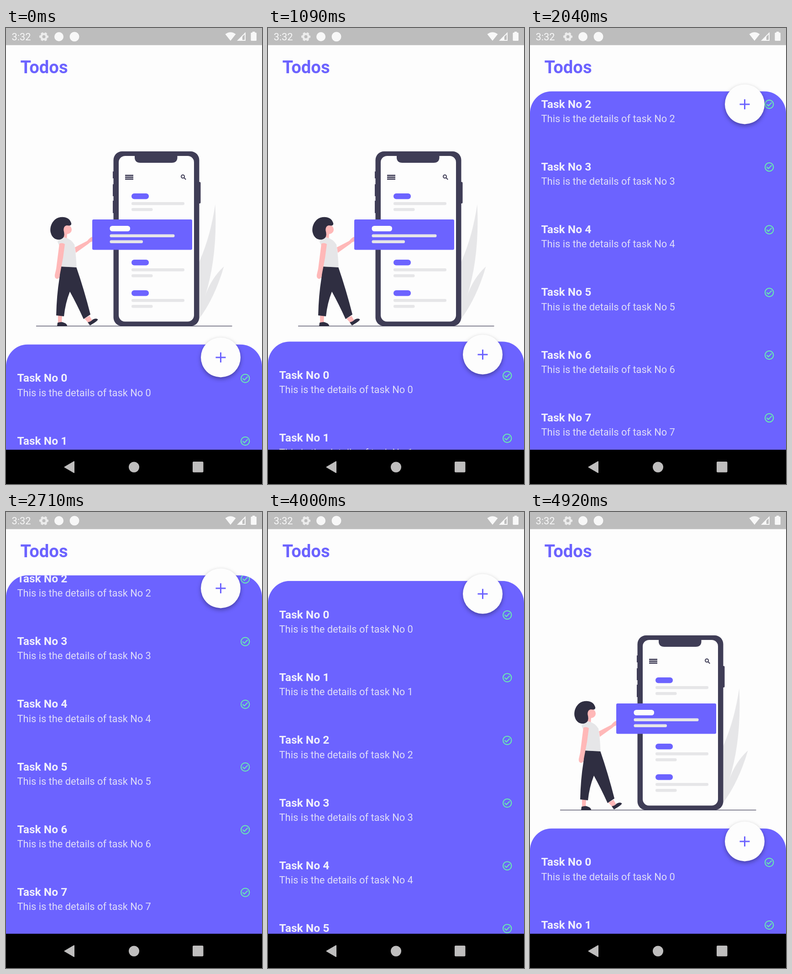
Animation, 561 px wide and 998 px high, one loop 4960 ms. Source, as an HTML page:

```html
<!DOCTYPE html>
<html>
<head>
<meta charset="utf-8">
<style>
  html, body { margin: 0; width: 100%; height: 100%; overflow: hidden; background: #fdfdfd; }
  svg { display: block; font-family: Roboto, sans-serif; }
  .dark { fill: #2f2e41; }
  .phone { fill: #3f3d56; }
  .purple { fill: #6c63ff; }
  .pale { fill: #e6e6e8; }
  .skin { fill: #ffb8b8; }
  .paper { fill: #fdfdfd; }
  .line { fill: none; stroke-width: 2; }
  #fab circle { filter: drop-shadow(0 4px 5px #0005); }
</style>
</head>
<body>
<svg width="561" height="998" viewBox="0 0 561 998">
  <defs>
    <clipPath id="sheetShape"><rect width="561" height="1000" rx="48"/></clipPath>
    <g id="entry">
      <rect class="purple" x="275" y="362" width="38" height="12.5" rx="6"/>
      <rect class="pale" x="275" y="381" width="116" height="6.5" rx="3"/>
      <rect class="pale" x="275" y="394" width="46.500" height="6.500" rx="3"/>
    </g>
    <g id="check" class="line" stroke="#69f0ae">
      <circle r="9.2"/>
      <path d="M-5.700-.3L-2 3.500 5.300-3.900"/>
    </g>
  </defs>

  <text class="purple" x="31.500" y="98.500" font-size="38.200" font-weight="700">Todos</text>

  <g id="plant" class="pale">
    <path d="M422 515Q448 458 458.500 386Q464 500 436 588Q428 615 422 640Z"/>
    <path d="M422 638Q457 592 477.500 522Q449 548 435 590L422 612Z"/>
  </g>

  <g id="device" class="phone">
    <path d="M234 314h4v15h-4zM234 342h4v26h-4zM234 378h4v27h-4z"/>
    <rect x="418" y="337" width="8.500" height="47" rx="2"/>
    <rect x="235.500" y="270" width="188" height="382.500" rx="19"/>
    <rect class="paper" x="247" y="280" width="165" height="362.500" rx="14"/>
    <path d="M282 279H375.500V283Q375.500 295 363 295H294.500Q282 295 282 283Z"/>
    <path d="M261 321.300h18v2.700h-18zM261 325.300h18v2.700h-18zM261 329.300h18v2.700h-18z"/>
    <g class="line" stroke="#3f3d56" stroke-width="1.500"><circle cx="387.500" cy="325" r="3.500"/><path d="M390 327.500l4.200 4.200"/></g>
    <use href="#entry"/><use href="#entry" y="145"/><use href="#entry" y="212"/>
  </g>
  <path d="M66 652.300H495.500" stroke="#3f3d56" stroke-width="1.300"/>

  <g id="woman">
    <path class="skin" d="M114 628h9l-1 18h-8zM172 636l11-6 6 10-9 5z"/>
    <path class="dark" d="M113 645Q123 642 127 645Q134 647 134 652.500H112ZM179 644Q186 643 190 638Q198 634 201.500 638Q200 642 184 651Z"/>
    <path class="skin" d="M151 480L178 466Q185 457 190 457V467Q184 468 181 472L153 492Z"/>
    <path class="dark" d="M119 522L154 523Q171 572 185 627L170 637Q155 604 140 577Q130 602 127 631L110 629Q111 585 117 548Z"/>
    <path class="skin" d="M118 452L134 448L133 464L116 466Z"/>
    <path class="pale" d="M113 468Q118 458 127 458Q142 461 150 474Q154 499 154.500 524L120 522Q124 503 122 488Z"/>
    <path class="skin" d="M117 472Q123 469 129 473L125 503L118 540Q118 549 111 549Q106 547 107 540L110 527Z"/>
    <circle class="skin" cx="134" cy="441" r="10"/>
    <path class="dark" d="M143 427C139 414 126 412 115 415C101 420 95 436 98 448C101 461 113 466 121 462C129 459 128 450 127 446C125 440 127 433 133 432C139 433 144 433 143 427Z"/>
  </g>

  <rect class="purple" x="189" y="419" width="219" height="66.500" rx="3"/>
  <rect class="paper" x="227.500" y="433" width="44.500" height="12" rx="5.500"/>
  <rect class="pale" x="227.500" y="451.500" width="142" height="6.500" rx="3"/>
  <rect class="pale" x="227.500" y="464.500" width="72.500" height="6.500" rx="3"/>

  <g id="sheet">
    <g clip-path="url(#sheetShape)">
      <rect class="purple" width="561" height="1000"/>
      <g id="list"></g>
    </g>
    <g id="fab">
      <circle class="paper" cx="470.500" cy="28.500" r="43.500"/>
      <path d="M459.500 28.500h22M470.500 17.500v22" stroke="#6c63ff" stroke-width="3"/>
    </g>
  </g>

  <rect width="561" height="37.500" fill="#bdbdbd"/>
  <g id="status" fill="#f8f8f8">
    <text x="12.500" y="27" font-size="21.800">3:32</text>
    <g fill="none" stroke="#ececec">
      <circle cx="83" cy="19" r="5.800" stroke-width="4.600"/>
      <circle cx="83" cy="19" r="8.500" stroke-width="3" stroke-dasharray="4.900 4" stroke-dashoffset="2.450"/>
    </g>
    <circle cx="116" cy="19" r="10"/>
    <circle cx="150" cy="19" r="10.500"/>
    <path d="M492 28L480.500 13.500Q492 5 503.500 13.500Z"/>
    <path class="line" stroke="#f8f8f8" d="M524 11.500V27H508.500Z"/>
    <path d="M508 27.500L518 17.500V27.500Z"/>
    <path d="M540 8h5.500v2h2q1.500 0 1.500 1.500v15q0 1.500-1.500 1.500h-9.500q-1.500 0-1.500-1.500v-15q0-1.500 1.500-1.500h2z"/>
  </g>

  <rect y="923" width="561" height="75"/>
  <g id="nav" fill="#bfbebe">
    <path d="M128.500 961L149 949V973Z" stroke="#bfbebe" stroke-width="2" stroke-linejoin="round"/>
    <circle cx="280.500" cy="961" r="11.500"/>
    <rect x="409" y="949" width="23.500" height="23.500" rx="2"/>
  </g>
</svg>
<script>
const LOOP = 4960, REST_TOP = 692.4, TRAVEL = 554, ROW = 137.25;
const sheet = document.getElementById('sheet');
const list = document.getElementById('list');

list.innerHTML = Array.from({ length: 9 }, (_, i) => `
  <g transform="translate(0 ${i * ROW})">
    <text x="24.6" y="82" font-size="24.57" font-weight="700" fill="#f0effc">Task No ${i}</text>
    <text x="24.6" y="113.300" font-size="21.84" fill="#dfddf8">This is the details of task No ${i}</text>
    <use href="#check" x="524.3" y="74.5"/>
  </g>`).join('');

// [time, drag distance]: one swipe up, then two swipes down
const keys = [
  [0, 0], [1040, 0], [1090, 6], [1200, 110], [1400, 460], [1590, 727],
  [1800, 830], [2100, 880], [2400, 895], [3050, 895], [3200, 790], [3400, 620],
  [3650, 554], [3950, 554], [4000, 542], [4150, 320], [4300, 100], [4450, 0], [LOOP, 0]
];
const slope = i => (keys[i + 1][1] - keys[i][1]) / (keys[i + 1][0] - keys[i][0]);

// Harmonic mean keeps the curve free of overshoot
function tangent(i) {
  if (i === 0 || i === keys.length - 1) return 0;
  const a = slope(i - 1), b = slope(i);
  return a * b > 0 ? 2 * a * b / (a + b) : 0;
}

function dragAt(time) {
  const i = keys.findIndex((key, n) => n && time < key[0]) - 1;
  const [t0, p0] = keys[i], [t1, p1] = keys[i + 1];
  const span = t1 - t0, u = (time - t0) / span, v = 1 - u;
  return v * v * (1 + 2 * u) * p0 + u * u * (3 - 2 * u) * p1
    + span * u * v * (v * tangent(i) - u * tangent(i + 1));
}

function draw() {
  const drag = dragAt(performance.now() % LOOP);
  sheet.setAttribute('transform', `translate(0 ${REST_TOP - Math.min(drag, TRAVEL)})`);
  list.setAttribute('transform', `translate(0 ${-Math.max(0, drag - TRAVEL)})`);
  requestAnimationFrame(draw);
}
draw();
</script>
</body>
</html>
```
